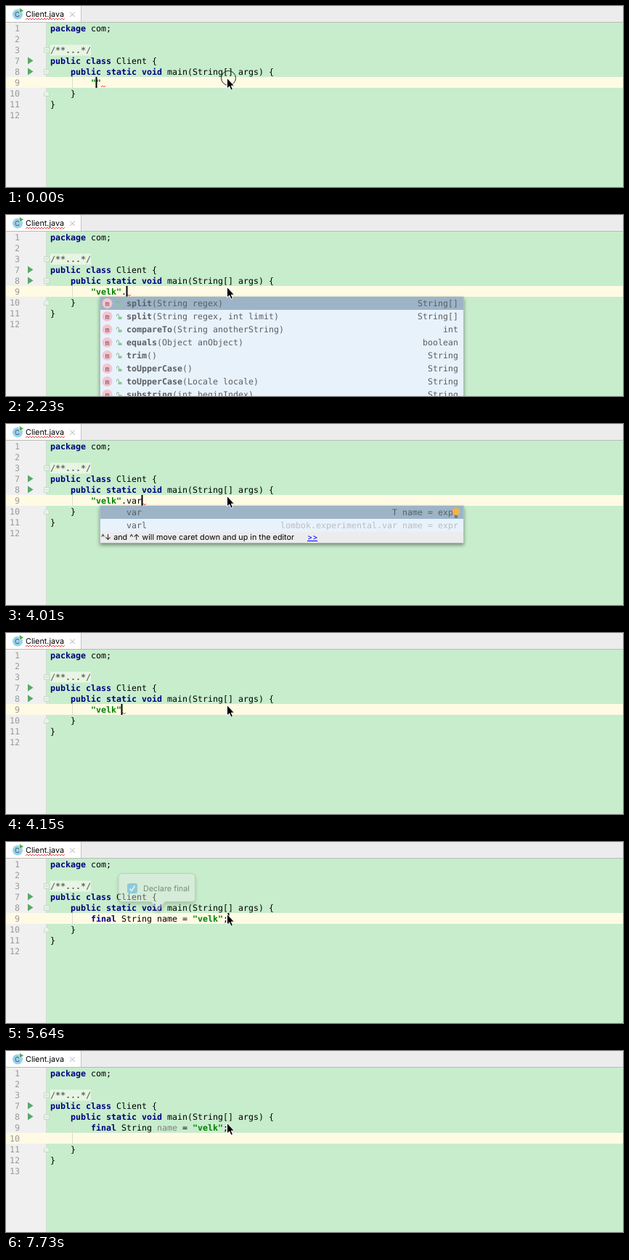
Recreate the animation shown at these times as an HTML page. Size 850 by 250 pixels, loop 8000 ms.

```html
<!DOCTYPE html>
<html lang="en">
<head>
<meta charset="utf-8">
<title>Postfix completion</title>
<style>
html, body { margin: 0; width: 100%; height: 100%; overflow: hidden; background: #c7edcc; }
svg { display: block; width: 850px; height: 250px; }
text { white-space: pre; text-rendering: geometricPrecision; }
.code { font: 11.63px "DejaVu Sans Mono", monospace; }
.ui { font: 10.8px Inter, "DejaVu Sans", sans-serif; }
.b { font-weight: bold; }
.kw { font-weight: bold; fill: #000080; }
.str { font-weight: bold; fill: #008000; }
</style>
</head>
<body>
<svg id="stage" viewBox="0 0 850 250" xmlns="http://www.w3.org/2000/svg">
  <defs>
    <filter id="shadow" x="-10%" y="-20%" width="120%" height="150%">
      <feDropShadow dx="0" dy="3" stdDeviation="2.5" flood-color="#000" flood-opacity=".42"/>
    </filter>
  </defs>
  <g id="view"></g>
</svg>
<script>
const LOOP = 8000, LEFT = 61, CHAR = 7, ROW = 15, TOP = 23;
const view = document.getElementById('view');

// Each step changes part of the editor's state.
const steps = [
  [0, { code: '""', caret: 1, squiggle: 2, ring: true, tabError: true, balloon: 0 }],
  [150, { ring: false }],
  [450, { caretOff: true }],
  [600, { caretOff: false }],
  [900, { code: '"ve"', caret: 3, squiggle: 4 }],
  [1050, { code: '"vel"', caret: 4, squiggle: 5 }],
  [1190, { code: '"velk"', caret: 5, squiggle: 6 }],
  [1480, { caret: 6 }],
  [2230, { code: '"velk".', caret: 7, squiggle: 7, popup: 'methods' }],
  [2380, { code: '"velk".v', caret: 8, squiggle: 8, popup: 'postfix' }],
  [2520, { code: '"velk".va', caret: 9, squiggle: 9 }],
  [2670, { code: '"velk".var', caret: 10, squiggle: 10 }],
  [3110, { bulb: true }],
  [3560, { caretOff: true }],
  [4010, { caretOff: false }],
  [4150, { code: '"velk"', caret: 6, squiggle: 6, popup: '', bulb: false }],
  [4300, { code: 'final String velk = "velk";', caret: 17, squiggle: 0, field: 'velk', selected: true }],
  [4450, { balloon: .5 }],
  [4600, { balloon: 1, popup: 'names' }],
  [5190, { code: 'final String na = "velk";', caret: 15, field: 'na', selected: false, popup: '' }],
  [5340, { code: 'final String name = "velk";', caret: 17, field: 'name' }],
  [5640, { caret: 27, field: '', balloon: .4 }],
  [5790, { balloon: .15 }],
  [5940, { balloon: 0, tabError: false, unused: true }],
  [6840, { extra: true, caret: 0 }],
  [6980, { foldMoved: true }],
  [7730, { caretOff: true }]
];

const methods = [
  ['split', '(String regex)', 'String[]'],
  ['split', '(String regex, int limit)', 'String[]'],
  ['compareTo', '(String anotherString)', 'int'],
  ['equals', '(Object anObject)', 'boolean'],
  ['trim', '()', 'String'],
  ['toUpperCase', '()', 'String'],
  ['toUpperCase', '(Locale locale)', 'String'],
  ['substring', '(int beginIndex)', 'String']
];

const rect = (x, y, w, h, fill, more = '') =>
  `<rect x="${x}" y="${y}" width="${w}" height="${h}" fill="${fill}" ${more}/>`;
const path = (d, fill, stroke = 'none', width = 1, more = '') =>
  `<path d="${d}" fill="${fill}" stroke="${stroke}" stroke-width="${width}" ${more}/>`;
const circle = (x, y, r, fill, stroke = 'none') =>
  `<circle cx="${x}" cy="${y}" r="${r}" fill="${fill}" stroke="${stroke}"/>`;
const text = (x, y, s, cls = 'code', fill = '#000', more = '') =>
  `<text x="${x}" y="${y}" class="${cls}" fill="${fill}" ${more}>${s}</text>`;
const END = 'text-anchor="end"', MID = 'text-anchor="middle"';

const paint = s => s.replace(/"[^"]*"|\b(?:package|public|class|static|void|final)\b/g,
  m => `<tspan class="${m[0] === '"' ? 'str' : 'kw'}">${m}</tspan>`);

function line(row, indent, s) {
  return text(LEFT + indent * CHAR, TOP + row * ROW + 12, paint(s));
}

function squiggle(x, y, w) {
  let d = `M${x} ${y}`;
  for (let i = 2; i <= w; i += 2) d += `L${x + i} ${y - (i % 4 ? 2 : 0)}`;
  return path(d, 'none', '#f03030', .9);
}

function tabBar(s) {
  return rect(0, 0, 850, 22, '#ececec') + rect(0, 0, 103, 22, '#fff') +
    rect(103, 0, 1, 22, '#c4c4c4') + rect(0, 22, 850, 1, '#b8bcb8') +
    circle(16, 11.5, 7, '#9bd2ea') +
    text(15.5, 15, 'C', 'ui', '#33566b', MID + ' style="font-size:9.5px"') +
    path('M18.5 2.5L24.5 6.3L18.5 10Z', '#4faa55', '#fff', .6) +
    text(27, 15, 'Client.java', 'ui') +
    (s.tabError ? squiggle(27, 19, 54) : '') +
    path('M88 8.5L95 15M95 8.5L88 15', 'none', '#b5b5b5', 1);
}

function fold(row, sign) {
  const y = TOP + row * ROW + 4.5;
  const box = sign ? `M52.5 ${y}h7v7h-7ZM54.5 ${y + 3.5}h3` : `M52.5 ${y + 7}v-4l3.5 -3.5l3.5 3.5v4Z`;
  return path(box + (sign === '+' ? `M56 ${y + 2}v3` : ''), '#e8f3e6', '#c3d3c3', .8);
}

function gutter(s) {
  const active = s.extra ? 6 : 5;
  const numbers = [1, 2, 3, 7, 8, 9, 10, 11, 12, ...(s.extra ? [13] : [])];
  return rect(0, 23, 55, 227, '#f0f0f0') + rect(55, 23, 1, 227, '#d2dcd2') +
    rect(0, TOP + active * ROW, 850, ROW, '#fffae3') +
    numbers.map((n, i) => text(19, TOP + i * ROW + 12, n, 'code', '#999', END)).join('') +
    [75.5, 90.5].map(y => path(`M30 ${y - 5}L37.5 ${y}L30 ${y + 5}Z`, '#59a869')).join('') +
    fold(2, '+') + fold(4, '-') + fold(s.foldMoved ? 7 : 6, '');
}

function code(s) {
  const last = s.extra ? 7 : 6, y = TOP + 5 * ROW;
  let out = rect(91, y, 1, s.extra ? 30 : 15, '#d5dfc9') +
    rect(61, 53.5, 56, 15, '#e9f5e4') +
    text(61, 65, '/**...*/', 'code b', '#5c6b5c') +
    line(0, 0, 'package com;') + line(3, 0, 'public class Client {') +
    line(4, 4, 'public static void main(String[] args) {') +
    line(last, 4, '}') + line(last + 1, 0, '}');
  if (s.field) {
    const w = s.field.length * CHAR;
    out += rect(208.5, y + .5, w + .5, 14, s.selected ? '#4472b0' : 'none', 'stroke="#f00"');
  }
  let content = paint(s.code);
  if (s.selected) content = content.replace(' velk ', ' <tspan fill="#fff">velk</tspan> ');
  if (s.unused) content = content.replace(' name ', ' <tspan fill="#808080">name</tspan> ');
  out += text(117, y + 12, content);
  if (s.squiggle) out += squiggle(117 + s.squiggle * CHAR, y + 14, 6);
  if (!s.caretOff) out += rect(117 + s.caret * CHAR - .5, y + (s.extra ? ROW : 0), 2, 15, '#000');
  return out;
}

const panel = (x, w, h) =>
  rect(x, 113, w, h, '#e8f2fb', 'stroke="#a9b8b5" stroke-width=".7" filter="url(#shadow)"');

function methodRow([name, args, type], i) {
  const y = 122 + 18 * i;
  return circle(139.5, y, 7, '#f3c5d0') +
    text(139.5, y + 3.5, 'm', 'code', '#6e5058', MID + ' style="font-size:10px"') +
    path(`M152.5 ${y}v-1.5a1.5 1.5 0 0 1 3 0v2`, 'none', '#7fb58a', 1) +
    rect(154.5, y + .5, 5, 3.5, '#8fc49a') +
    text(166, y + 4, `<tspan class="b">${name}</tspan>${args}`, 'code', '#5a5f64') +
    text(623, y + 4, type, 'code', '#5a5f64', END);
}

const popups = {
  methods: () => panel(129.5, 501, 160) + rect(130, 113, 500, 18, '#9db4c7') +
    methods.map(methodRow).join(''),
  postfix: s => panel(129.5, 501, 51) + rect(130, 113, 500, 18, '#9db4c7') +
    rect(130, 149, 500, 15, '#ececec') +
    text(166, 126, 'var', 'code', '#5a5f64') + text(623, 126, 'T name = expr', 'code', '#5a5f64', END) +
    text(166, 144, 'varl', 'code', '#5a5f64') +
    text(623, 144, 'lombok.experimental.var name = expr', 'code', '#b9bec3', END) +
    text(131, 160, '^↓ and ^↑ will move caret down and up in the editor', 'ui') +
    text(415, 160, '&gt;&gt;', 'ui', '#00f', 'text-decoration="underline"') +
    (s.bulb ? circle(620, 121, 5, '#f5b342') + rect(618, 126, 4, 4, '#77797b') : ''),
  names: () => panel(198.5, 156, 51) + rect(199, 149, 155, 15, '#ececec') +
    text(208, 126, 'velk') + text(208, 144, 's') +
    text(200, 160, 'Press ⇧⇥ to change type', 'ui')
};

function balloon(alpha) {
  const shape = 'M160 43.5H255.5Q260.5 43.5 260.5 48.5V77.5Q260.5 82.5 255.5 82.5H219L209.5 96' +
    'L200 82.5H160Q155 82.5 155 77.5V48.5Q155 43.5 160 43.5Z';
  return `<g opacity="${alpha}">` +
    path(shape, '#ececec', '#a0a5a0', 1, 'filter="url(#shadow)"') +
    rect(167, 57, 14, 14, '#3b94f2', 'rx="3"') +
    path('M170.5 64.5L173 67.5L177.5 60.5', 'none', '#fff', 1.7) +
    text(189, 68, 'Declare final', 'ui') + '</g>';
}

function pointer(ring) {
  return (ring ? circle(306.5, 99.5, 10, 'none', '#222') : '') +
    path('M304.5 99.5V114L307.8 111L310 116.3L312.5 115.2L310.3 110.2H314.5Z', '#000', '#fff', 1);
}

function draw(s) {
  return rect(0, 0, 850, 250, '#c7edcc') + tabBar(s) + gutter(s) + code(s) +
    (s.popup ? popups[s.popup](s) : '') + (s.balloon ? balloon(s.balloon) : '') + pointer(s.ring);
}

let shown = -1;
function render(time) {
  const t = time % LOOP;
  const done = steps.filter(([at]) => at <= t);
  if (done.length !== shown) {
    shown = done.length;
    view.innerHTML = draw(Object.assign({}, ...done.map(([, change]) => change),
      t >= 6840 && t < 7730 ? { caretOff: false } : {}));
  }
}

const start = performance.now();
function tick() {
  render(performance.now() - start);
  requestAnimationFrame(tick);
}
tick();
</script>
</body>
</html>
```
